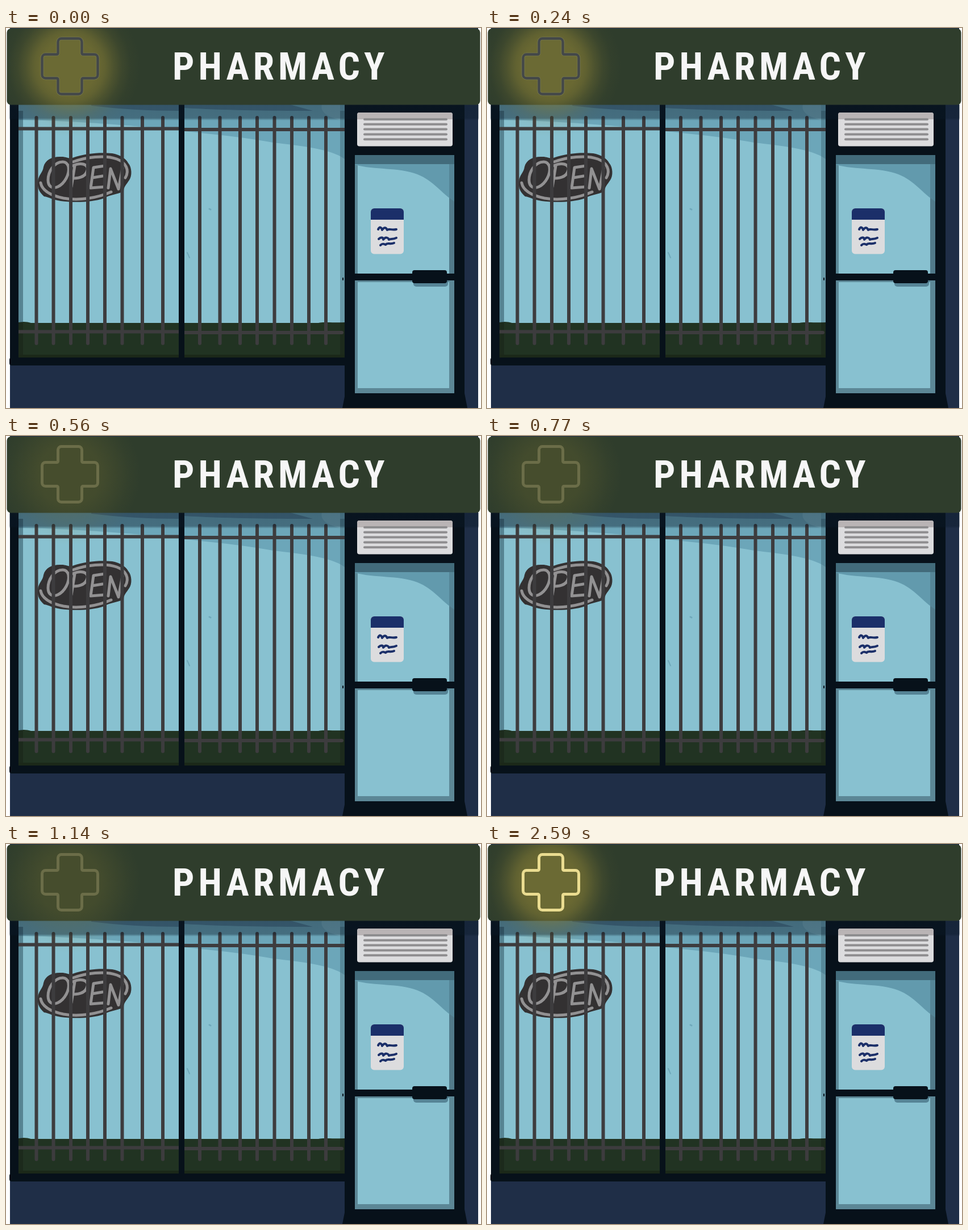
Recreate the animation shown at these times as an HTML page with a canvas. Size 836 by 670 pixels, loop 3390 ms.

```html
<!DOCTYPE html>
<html lang="en">
<head>
<meta charset="utf-8">
<title>Pharmacy front</title>
<style>
html, body { margin: 0; width: 100%; height: 100%; overflow: hidden; background: #fff; }
canvas { display: block; }
</style>
</head>
<body>
<canvas id="stage" width="836" height="670"></canvas>
<script>
const ctx = document.getElementById('stage').getContext('2d');
const DARK = '#07111a', GLASS = '#88c1d0', BAR = '#3d3c3e', PAPER = '#dcdcde', INK = '#1b2f69';
const LOOP = 3390;
// start time and lamp state
const STEPS = [[0, 'off'], [160, 'flash'], [240, 'off'], [560, 'dim'], [910, 'off'], [1140, 'dim'], [1390, 'on']];

function rect(x1, y1, x2, y2, color) {
  ctx.fillStyle = color;
  ctx.fillRect(x1, y1, x2 - x1, y2 - y1);
}

function round(x1, y1, x2, y2, r, color) {
  ctx.fillStyle = color;
  ctx.beginPath();
  ctx.roundRect(x1, y1, x2 - x1, y2 - y1, r);
  ctx.fill();
}

function shape(d, color) {
  ctx.fillStyle = color;
  ctx.fill(new Path2D(d));
}

function line(d, width, color, cap = 'round') {
  ctx.lineWidth = width;
  ctx.strokeStyle = color;
  ctx.lineCap = cap;
  ctx.lineJoin = 'round';
  ctx.stroke(new Path2D(d));
}

function drawGlass() {
  rect(22, 135, 596, 581, GLASS);
  shape('M22 135H596V231C572 213 520 208 470 202C410 191 360 187 314 182C240 173 130 165 22 163Z', '#6ca6b9');
  shape('M22 162C100 163 190 169 304 180V188H22Z', GLASS);
  shape('M150 135H304V146C250 146 200 143 150 137Z', '#527f96');
  shape('M314 135H500L540 146C460 146 380 145 314 141Z', '#527f96');
  shape('M556 135H588V162C570 158 552 150 556 135Z', '#7cb4c5');
  shape('M22 519C30 517 38 518 44 520H550C558 518 570 520 596 519V581H22Z', '#213322');
  rect(22, 146, 30, 519, 'rgba(38,73,88,.5)');
  rect(588, 146, 596, 519, 'rgba(55,92,108,.4)');
  rect(22, 519, 30, 576, 'rgba(20,28,20,.4)');
  rect(588, 519, 596, 576, 'rgba(20,28,20,.4)');
  rect(22, 576, 596, 581, '#1b2819');
  line('M358 319l2 1', 3, '#70a9bb');
  line('M319 396l4 9', 2, '#70a9bb');
}

function drawOpen() {
  shape('M56 272C56 260 65 255 66 245C69 232 82 226 98 227C106 227 111 231 117 229C140 221 165 219 187 221C200 223 211 230 215 238C222 246 222 261 217 268C212 276 207 280 207 288C197 293 182 294 173 300C150 308 118 308 96 305C82 303 76 298 67 297C59 290 55 282 56 272Z', '#333132');
  const tube = '#929192';
  line('M118 236C140 228 174 223 195 231C211 237 218 251 210 264', 5, tube);
  line('M61 273C64 289 82 296 101 300C128 305 160 300 185 289', 5, tube);
  line('M100 236C84 236 74 254 74 268C74 280 82 284 91 280C104 274 112 257 110 245C108 238 104 236 100 236Z', 5, tube);
  line('M121 243L115 280M117 243C132 236 146 240 143 251C140 263 127 265 118 265', 5, tube);
  line('M174 243L154 246L149 282L174 280M152 264L170 261', 5, tube);
  line('M180 282L184 248L198 284L205 247', 5, tube);
}

function drawBars() {
  const left = [53.5, 83.5, 114, 144, 174, 204.5, 240, 276];
  const right = [341, 376.5, 412, 442, 472.5, 503, 533, 563];
  for (const x of [...left, ...right]) line(`M${x} 158V556`, 6, BAR);
  line('M22 177.5H304M22 535.5H304M314 179H596', 6, BAR, 'butt');
  line('M314 537H591', 6, BAR);
}

function drawFrame() {
  rect(7, 135, 22, 590, DARK);
  rect(304, 135, 314, 588, DARK);
  round(6, 581, 602, 595, 4, DARK);
  shape('M596 135H807V644L812 670H592L596 650Z', DARK);
  line('M593 441v3', 2, DARK);
}

function drawDoor() {
  rect(614, 224, 789, 433, '#5c8998');
  rect(619, 240, 780, 433, GLASS);
  shape('M614 241C650 251 690 245 724 258C752 269 766 291 789 306V240H614Z', '#629aad');
  rect(780, 240, 789, 433, 'rgba(65,100,117,.4)');
  rect(614, 224, 789, 240, '#426b7b');
  rect(614, 445, 789, 644, '#5c8796');
  rect(619, 448, 780, 635, GLASS);
  round(717, 442, 778, 456, 5, 'rgba(60,100,120,.65)');
  rect(614, 433, 789, 444.5, DARK);
  round(715, 427, 776, 450, 4, DARK);

  round(642, 318, 700, 398.5, 6, PAPER);
  round(642, 318, 700, 338, [6, 6, 0, 0], INK);
  line('M655 355C658 349 661 352 662 356C666 350 669 352 671 356C675 353 678 357 687 355', 4, INK);
  line('M656 372C660 368 664 369 664 373C668 368 672 369 674 373C677 371 681 373 687 370', 4, INK);
  line('M659 383C663 379 665 381 668 382C672 378 677 382 683 379', 4, INK);
}

function drawVent() {
  round(618, 149, 786, 208.5, 4, PAPER);
  round(618, 149, 786, 161, [4, 4, 0, 0], '#b9b4b5');
  for (let i = 0; i < 5; i++) line(`M631 ${161 + i * 8.8}H775`, 4, '#8e8d8f');
}

function drawSign() {
  const shade = ctx.createLinearGradient(0, 135, 0, 163);
  shade.addColorStop(0, 'rgba(10,25,40,.42)');
  shade.addColorStop(0.85, 'rgba(10,25,40,.4)');
  shade.addColorStop(1, 'rgba(10,25,40,0)');
  rect(6, 135, 832, 163, shade);
  drawVent();
  round(1.5, 1, 834.5, 135.5, 7, '#2f3d2c');
}

function drawName() {
  const name = 'PHARMACY', x1 = 296, x2 = 667;
  ctx.fillStyle = '#f6f6f6';
  ctx.textAlign = 'left';
  ctx.font = 'bold condensed 67.5px "Roboto Condensed", "Liberation Sans Narrow", Roboto, sans-serif';
  ctx.letterSpacing = '0px';
  const m = ctx.measureText(name);
  const ink = m.actualBoundingBoxLeft + m.actualBoundingBoxRight;
  ctx.letterSpacing = (x2 - x1 - ink) / (name.length - 1) + 'px';
  ctx.fillText(name, x1 + m.actualBoundingBoxLeft, 91);
}

function glow(rgb, stops) {
  const g = ctx.createRadialGradient(112, 68, 0, 112, 68, 125);
  for (const [at, alpha] of stops) g.addColorStop(at / 125, `rgba(${rgb},${alpha})`);
  ctx.save();
  ctx.beginPath();
  ctx.rect(2, 1, 300, 200);
  ctx.clip();
  rect(0, 0, 240, 195, g);
  ctx.restore();
}

function crossPath() {
  const a = 21, b = 49;
  const pts = [[a, -b], [a, -a], [b, -a], [b, a], [a, a], [a, b], [-a, b], [-a, a], [-b, a], [-b, -a], [-a, -a], [-a, -b]];
  ctx.beginPath();
  ctx.moveTo(112.5, 67.5 - b);
  pts.forEach(([x, y], i) => {
    const [nx, ny] = pts[(i + 1) % pts.length];
    const r = Math.abs(x) === Math.abs(y) ? 2 : 6;
    ctx.arcTo(112.5 + x, 67.5 + y, 112.5 + nx, 67.5 + ny, r);
  });
  ctx.closePath();
}

function strokeCross(width, color) {
  ctx.lineWidth = width;
  ctx.strokeStyle = color;
  ctx.stroke();
}

function drawLamp(state) {
  glow('130,120,48', [[0, 0.27], [55, 0.24], [85, 0.13], [105, 0.05], [125, 0]]);
  if (state !== 'dim') glow('140,130,55', [[0, 0.53], [48, 0.52], [62, 0.42], [78, 0.2], [92, 0.06], [108, 0]]);
  crossPath();
  ctx.fillStyle = { flash: '#757138', dim: '#464d2d' }[state] || '#6b6a34';
  ctx.fill();
  if (state === 'off') {
    strokeCross(6, '#77794d');
    strokeCross(4.4, '#434748');
  } else {
    strokeCross(5, state === 'dim' ? '#6b6d48' : '#eadc90');
  }
}

function draw(state) {
  rect(0, 0, 836, 670, '#fff');
  rect(7, 0, 831, 670, '#1f2e47');
  drawGlass();
  drawOpen();
  drawBars();
  drawFrame();
  drawDoor();
  drawSign();
  drawLamp(state);
  drawName();
}

let shown = null;
function tick() {
  const t = performance.now() % LOOP;
  const state = STEPS.findLast(([start]) => t >= start)[1];
  if (state !== shown) draw(shown = state);
  requestAnimationFrame(tick);
}
tick();
</script>
</body>
</html>
```
